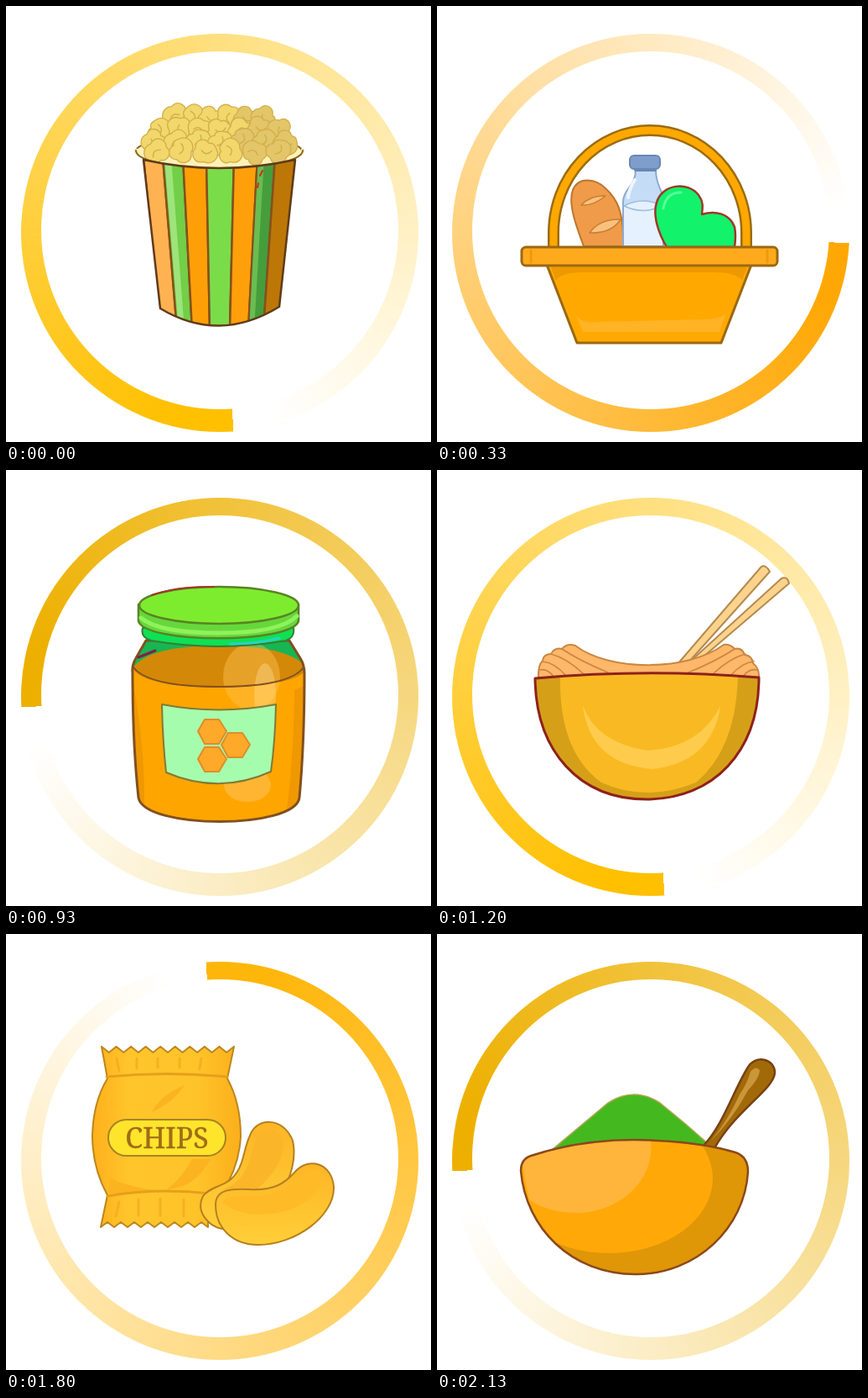
An HTML page for the animation above (2.4 s loop, 507x519 px).

```html
<!DOCTYPE html>
<html lang="en">
<head>
<meta charset="utf-8">
<title>Snack loader</title>
<style>
html, body { margin: 0; width: 100%; height: 100%; overflow: hidden; background: #fff; }
.ring, .hole { position: absolute; border-radius: 50%; }
.ring {
  left: 18px; top: 33px; width: 474px; height: 474px;
  background: conic-gradient(from var(--turn), var(--tint) 0 5%, #fff 97%);
  animation: turn 1.2s step-end infinite;
}
.hole { left: 42px; top: 54px; width: 426px; height: 426px; background: #fff; }
svg { position: absolute; left: 0; top: 0; stroke-linejoin: round; stroke-linecap: round; }
.food { visibility: hidden; animation: 2.4s step-end infinite; }
#popcorn { animation-name: popcorn; }
#basket { animation-name: basket; }
#honey { animation-name: honey; }
#noodles { animation-name: noodles; }
#chips { animation-name: chips; }
#bowl { animation-name: bowl; }
@keyframes turn {
  0% { --turn: 176deg; --tint: #ffc000; }
  27.5% { --turn: 93deg; --tint: #ffa805; }
  50% { --turn: 356deg; --tint: #ffb60a; }
  77.5%, 100% { --turn: 267deg; --tint: #edb000; }
}
@keyframes popcorn { 0% { visibility: visible; } 13.75%, 100% { visibility: hidden; } }
@keyframes basket { 0%, 38.75%, 100% { visibility: hidden; } 13.75% { visibility: visible; } }
@keyframes honey { 0%, 50%, 100% { visibility: hidden; } 38.75% { visibility: visible; } }
@keyframes noodles { 0%, 75%, 100% { visibility: hidden; } 50% { visibility: visible; } }
@keyframes chips { 0%, 88.75%, 100% { visibility: hidden; } 75% { visibility: visible; } }
@keyframes bowl { 0% { visibility: hidden; } 88.75%, 100% { visibility: visible; } }
</style>
</head>
<body>
<div class="ring"></div>
<div class="hole"></div>
<svg width="507" height="519" viewBox="0 0 507 519" fill="none">
  <defs>
    <clipPath id="tub"><path d="M164 183Q254 203 345 183L326 358Q254 402 184 360Z"/></clipPath>
    <clipPath id="dish"><path d="M117 248Q250 236 384 247C384 335 330 392 250 392S118 335 117 248Z"/></clipPath>
    <clipPath id="round"><path d="M100 282Q100 268 112 264Q170 245 235 245Q310 246 356 260Q371 265 371 283C367 350 310 405 237 405C160 405 106 350 100 282Z"/></clipPath>
    <clipPath id="jar"><path id="glass" d="M151 242Q150 232 155 224L167 203H338L351 224Q356 232 356 242Q356 325 350 390C345 428 165 428 158 390Q151 325 151 242Z"/></clipPath>
    <linearGradient id="foil">
      <stop stop-color="#ffb01c"/><stop offset=".25" stop-color="#ffc52b"/>
      <stop offset=".7" stop-color="#ffc32a"/><stop offset="1" stop-color="#fbaf1b"/>
    </linearGradient>
    <linearGradient id="chip" x2="0" y2="1">
      <stop stop-color="#fdb526"/><stop offset="1" stop-color="#ffcf38"/>
    </linearGradient>
  </defs>

  <g class="food" id="popcorn">
    <ellipse cx="254" cy="173" rx="99" ry="19" fill="#fff1b5" stroke="#83602b" stroke-width="2"/>
    <path d="M155 172C156 182 200 192 254 192S352 182 354 172" stroke="#fff1b5" stroke-width="5"/>
    <g id="kernels"></g>
    <path d="M155 172C155 184 200 194 254 194S354 184 354 172" stroke="#83602b" stroke-width="2"/>
    <g id="stripes" clip-path="url(#tub)" stroke="#85511c" stroke-width="2.5"></g>
    <path d="M164 183Q254 203 345 183L326 358Q254 402 184 360Z" stroke="#5f3a1a" stroke-width="2.5"/>
    <path d="M306 196l-3 6M301 211l-1 5" stroke="#db2818" stroke-width="2"/>
  </g>

  <g class="food" id="basket">
    <path d="M139 288V270A115 122 0 0 1 369 270V288" stroke="#9b6b12" stroke-width="14"/>
    <path d="M139 288V270A115 122 0 0 1 369 270V288" stroke="#ffa800" stroke-width="9"/>
    <path d="M175 286C166 262 156 235 162 219C169 202 190 206 201 217C215 230 223 244 222 286Z" fill="#f09b4a" stroke="#bb772f" stroke-width="2"/>
    <g fill="#f9c17d" stroke="#c77e32" stroke-width="1.5">
      <path d="M172 237Q187 238 201 226Q183 225 172 237ZM182 270Q194 253 219 254Q208 271 182 270Z"/>
    </g>
    <path d="M237 195H261C261 216 270 217 270 234V286H222V234C222 217 237 215 237 195Z" fill="#c5dcf7" stroke="#8dabd0" stroke-width="2"/>
    <path d="M223 238Q246 226 269 238V285H223Z" fill="#e5f1fe"/>
    <path d="M223 238Q246 249 269 238M223 238Q246 226 269 238" stroke="#9dbce0" stroke-width="1.5"/>
    <path d="M236 207Q229 218 228 228" stroke="#edf6ff" stroke-width="4"/>
    <rect x="230" y="178" width="36" height="16" rx="5" fill="#7f9dca" stroke="#6887b5" stroke-width="2"/>
    <path d="M237 195H260" stroke="#6887b5" stroke-width="4"/>
    <path d="M274 287C264 270 257 249 262 234C268 212 299 208 312 225C318 233 317 239 316 248C332 243 349 247 355 263Q357 273 355 287Z" fill="#12f26b" stroke="#9c3928" stroke-width="2.5"/>
    <path d="M270 241Q273 222 291 222" stroke="#55ff98" stroke-width="3"/>
    <path d="M131 308H375L339 401H167Z" fill="#ffa900" stroke="#9b6812" stroke-width="3"/>
    <path d="M136 311H370L364 326Q355 317 330 317H175Q147 317 142 327Z" fill="#ed9900"/>
    <path d="M166 369Q174 378 190 376L320 373Q336 373 344 367L337 388H174Z" fill="#ffb325"/>
    <rect x="101" y="287" width="305" height="22" rx="5" fill="#ffaa1c" stroke="#9b6812" stroke-width="3"/>
    <path d="M112 291V305M394 291V305" stroke="#f09a08" stroke-width="3"/>
  </g>

  <g class="food" id="honey">
    <g clip-path="url(#jar)">
      <path d="M145 195H360V430H145Z" fill="#ffa500"/>
      <path d="M145 195H360V236Q345 258 254 258T151 236Z" fill="#d48808"/>
      <path d="M145 195H360V236Q338 209 254 209T151 236Z" fill="#18b552"/>
      <ellipse cx="293" cy="246" rx="34" ry="40" fill="#ffc65b" opacity=".4"/>
      <ellipse cx="309" cy="268" rx="13" ry="38" fill="#ffe1a0" opacity=".35"/>
      <ellipse cx="288" cy="375" rx="28" ry="20" fill="#ffc35b" opacity=".55"/>
      <path d="M151 250Q166 330 165 400H145V250ZM344 262Q344 330 335 405H360V255Z" fill="#f09800"/>
    </g>
    <use href="#glass" stroke="#81501f" stroke-width="3"/>
    <path d="M152 235Q170 258 254 258T355 235" stroke="#81501f" stroke-width="2"/>
    <path d="M158 223L178 215" stroke="#852044" stroke-width="3"/>
    <path d="M163 188Q160 199 173 203Q254 217 334 203Q345 199 343 188Z" fill="#0ee154" stroke="#397b35" stroke-width="2"/>
    <path d="M267 207Q300 207 326 200" stroke="#25d4c1" stroke-width="3"/>
    <path d="M158 160V180C166 207 340 207 349 180V160Z" fill="#66d83b" stroke="#598324" stroke-width="2.5"/>
    <path d="M161 176Q182 194 254 194T347 174" stroke="#8ff25b" stroke-width="5"/>
    <ellipse cx="254" cy="161" rx="95" ry="22" fill="#7eec2e" stroke="#598324" stroke-width="2.5"/>
    <path d="M174 149Q204 138 248 139" stroke="#a53626" stroke-width="2"/>
    <path d="M186 279Q254 292 322 279Q321 324 316 359Q254 387 191 360Q187 324 186 279Z" fill="#a6fcad" stroke="#827a34" stroke-width="2"/>
    <g fill="#ffa92a" stroke="#df8d28" stroke-width="2">
      <path id="cell" d="M229 311L237 297H254L263 311L254 326H237Z"/>
      <use href="#cell" y="33"/><use href="#cell" x="28" y="16"/>
    </g>
  </g>

  <g class="food" id="noodles">
    <g fill="#fcd38d" stroke="#b68a4d" stroke-width="2">
      <path d="M287 231L387 115Q392 112 397 121L299 230Z"/>
      <path d="M302 228L411 129Q418 126 420 135L311 228Z"/>
    </g>
    <path d="M121 248C121 236 122 231 126 227Q127 219 136 219Q140 211 149 213Q155 206 165 209C205 240 299 240 342 208Q350 207 355 213Q364 211 367 220Q376 221 377 230Q385 236 384 248Z" fill="#ffb76a" stroke="#cb8641" stroke-width="2"/>
    <path id="strands" d="M126 228Q140 229 154 245M136 219Q155 224 175 243M149 213Q170 227 204 241M122 238Q132 236 139 246" stroke="#cb8641" stroke-width="1.7"/>
    <use href="#strands" transform="matrix(-1 0 0 1 504 0)"/>
    <g clip-path="url(#dish)">
      <path d="M110 230H390V400H110Z" fill="#f9b922"/>
      <path d="M110 245H147Q145 335 196 372Q250 396 309 372Q358 331 359 242H390V400H110Z" fill="#d5a018"/>
      <path d="M174 281Q191 325 251 334Q314 330 338 281Q328 348 257 356Q183 350 174 281Z" fill="#ffcb4c"/>
    </g>
    <path d="M117 248Q250 236 384 247C384 335 330 392 250 392S118 335 117 248Z" stroke="#8e211c" stroke-width="3"/>
  </g>

  <g class="food" id="chips">
    <path id="bag" fill="url(#foil)" stroke="#bd861f" stroke-width="2"/>
    <path d="M213 180Q184 192 174 212Q200 200 213 180ZM222 268Q212 288 192 304Q226 302 244 268ZM124 290Q142 300 176 305Q140 312 123 308Z" fill="#fbb31f"/>
    <path d="M120 170Q192 163 264 170M121 312Q180 302 244 309" stroke="#e5a01a" stroke-width="3"/>
    <path d="M132 148L135 163M156 148V160M181 148V159M207 148V159M233 148L231 161M135 319L131 336M158 316V335M184 315V335M212 316V336" stroke="#f5b020" stroke-width="3"/>
    <rect x="122" y="221" width="140" height="43" rx="21.5" fill="#ffe42c" stroke="#a88420" stroke-width="2"/>
    <text x="192" y="255" text-anchor="middle" font-family="'Noto Serif', serif" font-size="34" fill="#a06c17" stroke="#a06c17" stroke-width=".4">CHIPS</text>
    <g fill="url(#chip)" stroke="#b77f1e" stroke-width="2">
      <path d="M291 240C298 218 331 217 342 246C351 285 319 344 264 352C240 350 226 329 235 312C247 296 270 304 281 272C285 260 286 250 291 240Z"/>
      <path d="M300 238Q320 222 331 248Q331 277 299 304Q273 300 252 306Q283 299 291 267Z" fill="#fbb528" stroke="none"/>
      <path d="M250 322C250 304 268 303 290 304C320 306 333 296 344 284C361 264 389 273 391 301C392 336 345 370 301 370C270 370 250 350 250 322Z"/>
    </g>
    <path d="M258 320Q262 310 290 312Q329 312 350 289Q365 274 380 287Q368 326 317 333Q283 338 258 320Z" fill="#ffba28"/>
  </g>

  <g class="food" id="bowl">
    <path d="M137 257Q167 232 204 201Q235 181 266 201Q296 225 325 251Z" fill="#43b91f" stroke="#b4a650" stroke-width="1.5"/>
    <path d="M317 253C341 228 352 190 370 160C380 142 403 149 403 165C402 185 357 209 331 255Z" fill="#a26908" stroke="#774116" stroke-width="2.5"/>
    <path d="M327 246Q347 222 361 191Q370 178 374 164Q380 156 385 162Q385 171 371 186Q353 220 327 246Z" fill="#c99639"/>
    <g clip-path="url(#round)">
      <path d="M95 240H375V410H95Z" fill="#df9607"/>
      <ellipse cx="205" cy="291" rx="124" ry="89" fill="#ffa808"/>
      <path d="M95 240H254C264 290 220 332 165 332Q130 331 110 316Z" fill="#ffb43b"/>
    </g>
    <path d="M100 282Q100 268 112 264Q170 245 235 245Q310 246 356 260Q371 265 371 283C367 350 310 405 237 405C160 405 106 350 100 282Z" stroke="#8b481b" stroke-width="2.5"/>
  </g>
</svg>
<script>
const byId = id => document.getElementById(id);
const mix = (a, b, t) => a + (b - a) * t;

// Tub stripes taper towards the base.
const tops = [164, 187, 211, 239, 272, 300, 321, 345];
const feet = [184, 204, 222, 243, 267, 289, 307, 326];
const fills = ['#ffb251', '#72cf47', '#ff9f08', '#7bdc49', '#ff9f0a', '#469d3b', '#bd7707'];
const panel = (a, b, c, d) => `M${a} 180H${b}L${c} 386H${d}Z`;
byId('stripes').innerHTML = fills.map((fill, i) =>
  `<path d="${panel(tops[i], tops[i + 1], feet[i + 1], feet[i])}" fill="${fill}"/>`).join('') +
  `<path d="${panel(189, 197, 213, 206)}" fill="#9de47b" stroke="none"/>` +
  `<path d="${panel(301, 308, 296, 290)}" fill="#69bd51" stroke="none"/>`;

// Overlapping kernels fill a low dome.
let seed = 7;
const random = () => (seed = seed * 16807 % 2147483647) / 2147483647;
const rows = [[133, 202, 308, 6], [147, 183, 327, 7], [161, 177, 334, 7], [173, 180, 325, 6]];
byId('kernels').innerHTML = rows.map(([y, left, right, count]) =>
  Array.from({ length: count }, (_, i) => {
    const x = mix(left, right, i / (count - 1));
    const cy = y + random() * 4 - 2;
    const fill = x > 280 ? '#e2c668' : '#f1d76c';
    return `<g transform="translate(${x} ${cy}) rotate(${random() * 360}) scale(1.22)" stroke="#d3ae4b" stroke-width="1.1">
      <path d="M-10 4C-16-5-7-14 1-10C11-13 15-3 10 3C11 12 0 14-3 8Q-7 10-10 4Z" fill="${fill}"/>
      <path d="M-6 1Q-1-5 4 1"/></g>`;
  }).join('')).join('');

// Bag with serrated ends.
const teeth = (from, to, y, depth, count) => Array.from({ length: 2 * count + 1 }, (_, i) =>
  `L${mix(from, to, i / count / 2)} ${y + (i % 2 ? depth : 0)}`).join('');
byId('bag').setAttribute('d',
  'M121 172L114 134' + teeth(114, 272, 134, 7, 9) +
  'L264 172Q280 201 280 241Q278 278 257 309L241 343' + teeth(241, 113, 349, -6, 8) +
  'L121 311Q103 278 103 240Q104 200 121 172Z');
</script>
</body>
</html>
```
